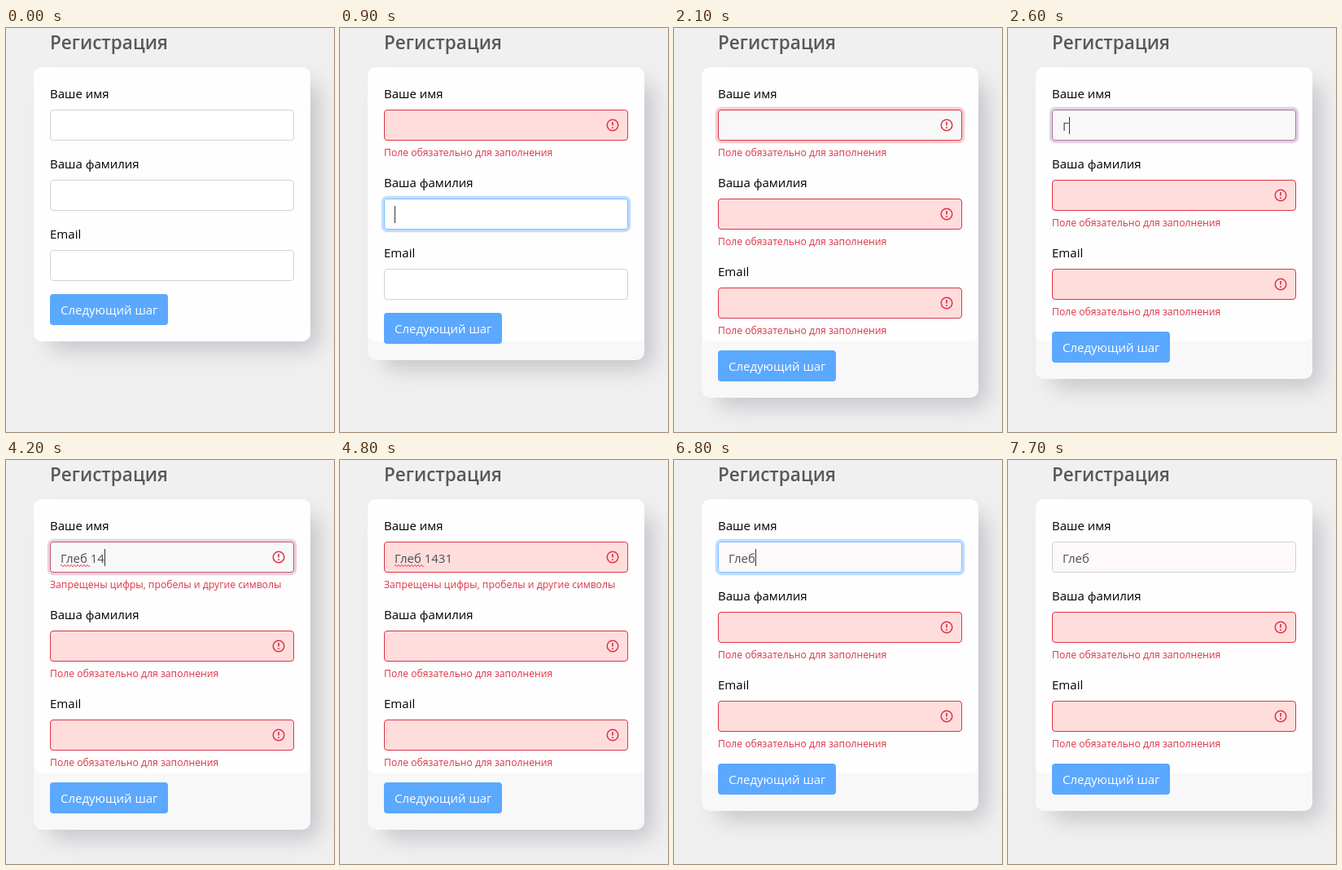
Animation, 403 px wide and 495 px high, one loop 8 s. Source, as an HTML page:

```html
<!DOCTYPE html>
<html lang="ru">
<head>
<meta charset="utf-8">
<style>
  html, body { margin: 0; width: 100%; height: 100%; overflow: hidden; background: #f0f0f0; }
  svg { display: block; width: 403px; height: 495px; }
  text { font: 15px "Open Sans", "Noto Sans", sans-serif; white-space: pre; }
  .title { font-size: 22.5px; font-weight: 600; fill: #58595e; }
  .value { fill: #495057; }
  .error { font-size: 12.2px; fill: #dc3545; }
  .button { fill: #fff; font-weight: 500; }
</style>
</head>
<body>
<svg id="stage" viewBox="0 0 403 495"></svg>
<script>
const LOOP = 8000, FADE = 150, STEP = 100;
const NAME = "Глеб", NB = "\u00a0";
const REQUIRED = "Поле обязательно для заполнения";
const SYMBOLS = "Запрещены цифры, пробелы и другие символы";
const GREY = [206, 212, 218, 1], BLUE = [128, 189, 255, 1], RED = [220, 53, 69, 1];
const NO_RING = [255, 255, 255, 0], BLUE_RING = [0, 123, 255, .25], RED_RING = [220, 53, 69, .25];

const stage = document.getElementById("stage");

function add(parent, tag, attrs = {}, text) {
  const el = document.createElementNS("http://www.w3.org/2000/svg", tag);
  set(el, attrs);
  if (text) el.textContent = text;
  parent.appendChild(el);
  return el;
}
function set(el, attrs) {
  for (const key in attrs) el.setAttribute(key, attrs[key]);
}
const show = (el, on) => set(el, { visibility: on ? "visible" : "hidden" });

// Value of the last [time, value] pair already reached
function at(track, t) {
  let value = track[0][1];
  for (const [time, v] of track) if (t >= time) value = v;
  return value;
}

// Same, but colours ease into each other
function blend(track, t) {
  let i = 0;
  while (i + 1 < track.length && t >= track[i + 1][0]) i++;
  const to = track[i][1], from = i ? track[i - 1][1] : to;
  const p = Math.min(1, (t - track[i][0]) / FADE);
  const k = p * p * (3 - 2 * p);
  const a = from[3] + (to[3] - from[3]) * k;
  const mix = j => a ? (from[j] * from[3] * (1 - k) + to[j] * to[3] * k) / a : 255;
  return `rgba(${mix(0)},${mix(1)},${mix(2)},${a})`;
}

// Each field: [time, focused, invalid, background]
const PINK = "#ffdddd", PALE = "#f8f8f8", ROSE = "#fdf9fa";
const fields = [
  { label: "Ваше имя", states: [
    [0, 0, 0, "#fff"], [350, 1, 0, "#fff"], [740, 0, 1, PINK], [1540, 1, 1, PALE],
    [2530, 1, 0, PALE], [4100, 1, 1, PALE], [4640, 0, 1, PINK], [5690, 1, 1, ROSE],
    [6640, 1, 0, ROSE], [7560, 0, 0, ROSE]] },
  { label: "Ваша фамилия", states: [
    [0, 0, 0, "#fff"], [740, 1, 0, "#fff"], [1140, 0, 1, PINK]] },
  { label: "Email", states: [
    [0, 0, 0, "#fff"], [1140, 1, 0, "#fff"], [1540, 0, 1, PINK]] }
];
const typed = [[0, ""], [2600, NAME.slice(0, 1)], [2700, NAME.slice(0, 2)], [2800, NAME.slice(0, 3)],
  [2900, NAME], [3800, NAME + NB], [4200, NAME + NB + "14"], [4300, NAME + NB + "143"],
  [4400, NAME + NB + "1431"], [6400, NAME + NB + "143"], [6500, NAME + NB + "14"], [6700, NAME]];
// Index of the field that shows the caret, -1 for none
const carets = [[0, -1], [400, 0], [800, 1], [1200, 2], [1600, 0], [2100, -1], [2600, 0], [3400, -1],
  [3800, 0], [4700, -1], [5700, 0], [6200, -1], [6700, 0], [7200, -1]];

const defs = add(stage, "defs");
const soft = add(defs, "filter", { id: "soft", x: "-30%", y: "-30%", width: "160%", height: "160%" });
add(soft, "feGaussianBlur", { stdDeviation: 14 });
const pick = add(defs, "clipPath", { id: "pick" });
add(pick, "rect", { x: 99, y: 142, width: 74, height: 19 });

add(stage, "rect", { width: 403, height: 495, fill: "#f0f0f0" });
const shadow = add(stage, "rect", { x: 54, y: 68, width: 330, rx: 10, fill: "#b4b4bc", opacity: .75, filter: "url(#soft)" });
const card = add(stage, "rect", { x: 34, y: 48, width: 340, rx: 10, fill: "#f8f8f8" });
add(stage, "rect", { x: 34, y: 48, width: 340, height: 336, rx: 10, fill: "#fefefe" });
add(stage, "text", { x: 54, y: 26, class: "title" }, "Регистрация");

for (const f of fields) {
  f.border = f.states.map(([t, focus, bad]) => [t, bad ? RED : focus ? BLUE : GREY]);
  f.glow = f.states.map(([t, focus, bad]) => [t, !focus ? NO_RING : bad ? RED_RING : BLUE_RING]);
  f.group = add(stage, "g");
  add(f.group, "text", { x: 54, y: 86 }, f.label);
  f.ring = add(f.group, "rect", { x: 52.4, y: 98.4, width: 303.2, height: 41.2, rx: 5.6, fill: "none", "stroke-width": 3.2 });
  f.box = add(f.group, "rect", { x: 54.5, y: 100.5, width: 299, height: 37, rx: 3.5 });
  f.bad = add(f.group, "g");
  add(f.bad, "circle", { cx: 335, cy: 119, r: 6.8, fill: "none", stroke: "#dc3545", "stroke-width": 1.5 });
  add(f.bad, "path", { d: "M335 115v4.6M335 121.3v1.7", stroke: "#dc3545", "stroke-width": 1.7 });
  f.error = add(f.bad, "text", { x: 54, y: 157, class: "error" }, REQUIRED);
}

const first = fields[0].group;
const value = add(first, "text", { x: 67, y: 126, class: "value" });
let wave = "M67 129.5";
for (let x = 67; x < 101; x += 4) wave += "q1 -2.4 2 0t2 0";
const squiggle = add(first, "path", { d: wave, fill: "none", stroke: "#e8303c" });
const selection = add(first, "g", { "clip-path": "url(#pick)" });
add(selection, "rect", { x: 99, y: 142, width: 74, height: 19, fill: "#3390e8" });
add(selection, "text", { x: 54, y: 157, class: "error", style: "fill:#fff" }, SYMBOLS);

const caret = add(stage, "rect", { width: 1, height: 21, fill: "#333" });
const button = add(stage, "g");
add(button, "rect", { x: 54, y: 326, width: 145, height: 38, rx: 4, fill: "#5ba8ff" });
add(button, "text", { x: 67, y: 351, class: "button" }, "Следующий шаг");

function render(ms) {
  const t = Math.floor(ms / STEP) * STEP;
  const caretField = at(carets, t);
  const text = at(typed, t);
  value.textContent = text;
  show(caret, caretField >= 0);

  let drop = 0;
  fields.forEach((f, i) => {
    const [, , bad, fill] = at(f.states.map(s => [s[0], s]), t);
    const y = i * 86 + drop;
    set(f.group, { transform: `translate(0 ${y})` });
    set(f.box, { stroke: blend(f.border, t), fill });
    set(f.ring, { stroke: blend(f.glow, t) });
    show(f.bad, bad);
    if (i === caretField) {
      const w = !i && text ? value.getComputedTextLength() : 0;
      set(caret, { x: Math.round(67 + w), y: 109 + y });
    }
    if (bad) drop += 23;
  });

  fields[0].error.textContent = t >= 4200 ? SYMBOLS : REQUIRED;
  show(squiggle, t >= 3900 && t < 6700);
  show(selection, t >= 5200 && t < 5400);
  set(button, { transform: `translate(0 ${drop})` });
  set(card, { height: 336 + drop });
  set(shadow, { height: 326 + drop });
}

const start = performance.now();
function tick() {
  render((performance.now() - start) % LOOP);
  requestAnimationFrame(tick);
}
render(0);
tick();
</script>
</body>
</html>
```
